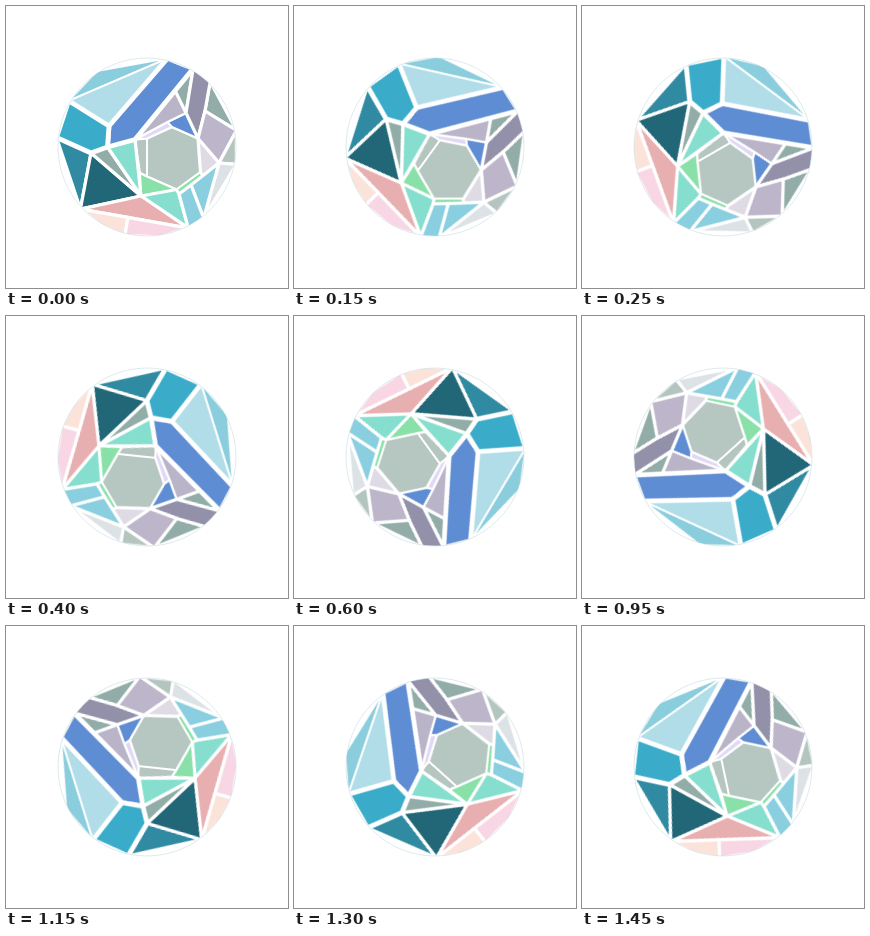
An HTML page that plays this animation: 282x282 px, repeating every 1.5 s.

```html
<!DOCTYPE html>
<html lang="en">
<head>
<meta charset="utf-8">
<title>Mosaic disc</title>
<style>
  html, body { margin: 0; width: 100%; height: 100%; overflow: hidden; background: #fff; }
  svg { display: block; width: 100vw; height: 100vh; }
  #disc { transform-origin: 141px 141px; stroke: #fff; stroke-linejoin: round; }
  #rim { fill: none; stroke: #9fc4d0; stroke-width: .8; opacity: .45; }
</style>
</head>
<body>
<svg viewBox="0 0 282 282">
  <clipPath id="round"><circle cx="141" cy="141" r="89"/></clipPath>
  <g clip-path="url(#round)"><g id="disc"></g></g>
  <circle id="rim" cx="141" cy="141" r="89"/>
</svg>
<script>
const disc = document.getElementById('disc');
const CENTRE = 141, RADIUS = 91;

const onRim = deg => {
  const a = deg * Math.PI / 180;
  return [CENTRE + RADIUS * Math.cos(a), CENTRE + RADIUS * Math.sin(a)];
};
const between = (p, q, k) => p.map((v, i) => v + (q[i] - v) * k);

// Joints of the leading: capitals lie on the rim, small letters inside.
const joint = {
  a: [103, 120], b: [101.5, 141], c: [85, 147], d: [135, 190], e: [129, 133.5],
  f: [141, 132.5], g: [166, 121], h: [192, 132.5], i: [194.5, 166], j: [170.5, 183.5],
  k: [141, 170.5], l: [134, 167], m: [161.5, 116], n: [180, 107], p: [199, 105],
  q: [213, 157], r: [197, 170], t: [173, 188]
};
[186, 210.5, 236.5, 283, 300.5, 314, 349.5, 11, 51.5, 63, 82, 104, 120, 137]
  .forEach((deg, i) => joint['ABCDEFGHIJKLMN'[i]] = onRim(deg));
joint.o = between(joint.e, joint.E, .69);
joint.s = between(joint.r, joint.t, .5);
joint.u = between(joint.N, joint.J, .44);

// Panes by colour, grouped by the width of the leading around them.
const groups = [
  [2, {
    '#8acddd': 'BCD', '#b0dde7': 'BDa', '#b5c6c1': 'efkl', '#b6c7c2': 'fghijk',
    '#e0d8f5': 'emgf', '#5f8dd3': 'mnhg', '#b9b4c8': 'eonm', '#8ae0a9': 'lkjd irtj'
  }],
  [3.2, {
    '#2f8aa2': 'AcN', '#226778': 'cdN', '#92ada7': 'cbd oEn FGp', '#86dfce': 'bed djtJ',
    '#9390aa': 'EFphn', '#bdb6ca': 'pGqh', '#dedbe5': 'hqri', '#b4c5c0': 'GHq',
    '#dce2e5': 'qHI', '#89cfe0': 'qIs sIJt', '#e8afb0': 'NdJ', '#fbe3da': 'NuLM',
    '#f9d6e4': 'uJKL'
  }],
  [4.8, { '#5f8dd3': 'aDEeb', '#3aacc9': 'BabcA' }]
];

for (const [width, colours] of groups) {
  for (const [fill, shapes] of Object.entries(colours)) {
    for (const shape of shapes.split(' ')) {
      const pane = document.createElementNS('http://www.w3.org/2000/svg', 'polygon');
      pane.setAttribute('fill', fill);
      pane.setAttribute('stroke-width', width);
      pane.setAttribute('points', [...shape].map(key => joint[key]).join(' '));
      disc.append(pane);
    }
  }
}

// One clockwise turn in 30 equal ticks.
disc.animate(
  [{ transform: 'rotate(0deg)' }, { transform: 'rotate(360deg)' }],
  { duration: 1500, iterations: Infinity, easing: 'steps(30, end)' }
);
</script>
</body>
</html>
```
